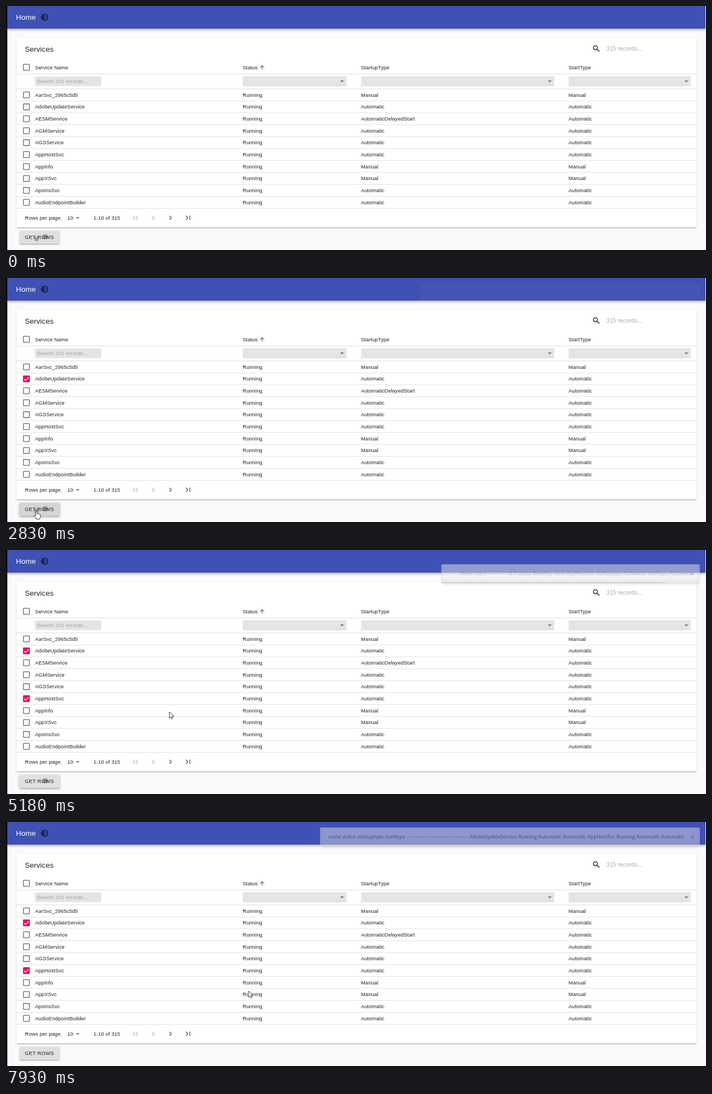
Recreate the animation shown at these times as an HTML page. Size 1264x443 px, loop 8 s.

```html
<!DOCTYPE html>
<html lang="en">
<head>
<meta charset="utf-8">
<title>Services</title>
<style>
  html, body { margin: 0; width: 100%; height: 100%; overflow: hidden; background: #fafafa; }
  #stage { position: absolute; left: 0; top: 0; width: 1264px; height: 443px; overflow: hidden; }
  #stage > div, #stage > svg, .toast, .toast > * { position: absolute; }
  svg { left: 0; top: 0; overflow: visible; }
  text { font: 9.333px "Liberation Sans", Arial, sans-serif; letter-spacing: .01em; fill: #212121; white-space: pre; }
  .title { font-size: 13.333px; letter-spacing: .0075em; }

  #bar { left: 2px; top: 0; width: 1261px; height: 41px; background: #3f51b5;
    box-shadow: 0 1.3px 2.7px -.7px #0003, 0 2.7px 3.3px #00000024, 0 .7px 6.7px #0000001f; }
  #paper { left: 18.5px; top: 57px; width: 1228.5px; height: 345px; background: #fff; border-radius: 2.7px;
    box-shadow: 0 2px .7px -1.3px #0003, 0 1.3px 1.3px #00000024, 0 .7px 3.3px #0000001f; }
  #button { left: 24px; top: 408px; width: 72.5px; height: 23.5px; background: #e0e0e0; border-radius: 2.7px;
    box-shadow: 0 2px .7px -1.3px #0003, 0 1.3px 1.3px #00000024, 0 .7px 3.3px #0000001f;
    animation: hover 8s infinite; }
  @keyframes hover {
    0%, 24.5%, 51.5%, 70%, 87.5%, 100% { background: #e0e0e0; }
    27.5%, 48.8%, 73%, 84.5% { background: #d5d5d5;
      box-shadow: 0 1.3px 2.7px -.7px #0003, 0 2.7px 3.3px #00000024, 0 .7px 6.7px #0000001f; }
  }

  .tick { animation: tick1 8s step-end infinite; }
  .tick.late { animation-name: tick2; }
  @keyframes tick1 { 0% { opacity: 0; } 14%, 100% { opacity: 1; } }
  @keyframes tick2 { 0% { opacity: 0; } 58.6%, 100% { opacity: 1; } }

  .ripple { transform-box: fill-box; transform-origin: center; animation: ripple 8s ease-out infinite both; }
  @keyframes ripple {
    0% { transform: scale(.1); opacity: .28; }
    4% { transform: scale(.9); opacity: .22; }
    8%, 100% { transform: scale(1); opacity: 0; }
  }

  /* keeps a toast that is still fading from carrying over into the next loop */
  #toasts { animation: curtain 8s step-end infinite; }
  @keyframes curtain { 0% { visibility: hidden; } 12%, 100% { visibility: visible; } }
  .toast { top: 9.5px; height: 34.5px; border-radius: 2px; background: rgba(238, 238, 238, .9);
    box-shadow: inset 0 -6.7px 13.3px -6.7px #0003, inset 0 0 3.3px #0000001a, 0 5.3px 5.3px -3.3px #00000040;
    animation: toast 8s infinite both; animation-delay: inherit; }
  .toast > * { animation: 8s infinite both; animation-delay: inherit; }
  .toast span { left: 16px; top: 10px; font: 9.333px/14px Lato, sans-serif; color: rgba(0, 0, 0, .6);
    white-space: pre; animation-name: message; }
  .toast i { left: 0; bottom: 0; width: 100%; height: 1.4px; background: rgba(0, 0, 0, .4);
    transform-origin: left; animation-name: progress; animation-timing-function: linear; }
  .toast svg { left: auto; right: 11px; top: 15px; }
  @keyframes toast {
    0% { opacity: 0; transform: translateY(100%); animation-timing-function: ease; }
    8.75% { opacity: 1; transform: none; }
    13.56% { opacity: 1; transform: none; animation-timing-function: ease; }
    19.8%, 100% { opacity: 0; transform: none; }
  }
  @keyframes message {
    0%, 1.25% { opacity: 0; transform: translateX(33.3px); animation-timing-function: cubic-bezier(.16, .81, .32, 1); }
    13.75%, 100% { opacity: 1; transform: none; }
  }
  @keyframes progress { 0%, 1.06% { transform: none; } 13.56%, 100% { transform: scaleX(0); } }

  #cursor { animation: move 8s infinite ease-in-out, enter 8s step-end infinite; }
  #arrow { animation: arrow 8s step-end infinite; }
  #hand { animation: hand 8s step-end infinite; }
  #cursor path { fill: #fff; stroke: #23232d; stroke-width: .9; stroke-linejoin: round; }
  @keyframes enter { 0% { visibility: hidden; } 2.62%, 100% { visibility: visible; } }
  @keyframes arrow {
    0%, 17.6%, 48.8%, 61.2%, 84.5% { opacity: 1; }
    10.6%, 24.5%, 55%, 70% { opacity: 0; }
  }
  @keyframes hand {
    0%, 17.6%, 48.8%, 61.2%, 84.5% { opacity: 0; }
    10.6%, 24.5%, 55%, 70% { opacity: 1; }
  }
  @keyframes move {
    0%, 2.62% { transform: translate(1124px, 430px); }
    11.25%, 17.3% { transform: translate(36px, 179px); }
    20%, 20.9% { transform: translate(99px, 254px); animation-timing-function: linear; }
    23% { transform: translate(75px, 405px); animation-timing-function: ease-out; }
    25% { transform: translate(60px, 421px); }
    34% { transform: translate(58px, 421px); }
    35.3%, 46% { transform: translate(55px, 423px); }
    49% { transform: translate(62px, 412px); }
    51.75%, 52.9% { transform: translate(70.5px, 340px); }
    55.5%, 61% { transform: translate(37px, 267px); }
    64.75%, 65.7% { transform: translate(295px, 294px); }
    69.5% { transform: translate(100px, 418px); animation-timing-function: ease-out; }
    72% { transform: translate(70px, 428px); }
    79%, 83.5% { transform: translate(71px, 417px); }
    90.6% { transform: translate(359px, 412px); }
    95% { transform: translate(438px, 330px); }
    99.1%, 100% { transform: translate(438px, 307px); }
  }
</style>
</head>
<body>
<div id="stage">
  <div id="bar"></div>
  <div id="paper"></div>
  <div id="button"></div>
  <svg id="page" width="1264" height="443">
    <clipPath id="buttonClip"><rect x="24" y="408" width="72.5" height="23.5" rx="2.7"/></clipPath>
  </svg>
  <div id="toasts"></div>
  <svg width="1264" height="443">
    <rect width="2.3" height="443"/>
    <rect x="1263" width="1" height="443" fill="#eee"/>
    <g id="cursor">
      <path id="arrow" d="M0 0V11.2L2.6 8.8 4.3 12.7 6.2 11.9 4.5 8.1H8Z"/>
      <path id="hand" d="M-1.4 1.2C-1.4-.4 1.2-.4 1.2 1.2V5.2C2 4.5 3.4 4.8 3.5 5.7 4.3 5.1 5.5 5.4 5.6 6.3 6.5 6 7.3 6.5 7.3 7.4V10.5C7.3 12.5 6 13 6 14.6H-.4C-.8 12.6-4 10.5-4.3 8.2-4.3 7-2.6 7-1.4 8.8Z"/>
    </g>
  </svg>
</div>
<script>
const icons = {
  theme: 'M20 8.69V4h-4.69L12 .69 8.69 4H4v4.69L.69 12 4 15.31V20h4.69L12 23.31 15.31 20H20v-4.69L23.31 12 20 8.69zM12 18c-.89 0-1.74-.2-2.5-.55C11.56 16.5 13 14.42 13 12s-1.44-4.5-3.5-5.45C10.26 6.2 11.11 6 12 6c3.31 0 6 2.69 6 6s-2.69 6-6 6z',
  search: 'M15.5 14h-.79l-.28-.27C15.41 12.59 16 11.11 16 9.5 16 5.91 13.09 3 9.5 3S3 5.91 3 9.5 5.91 16 9.5 16c1.61 0 3.09-.59 4.23-1.57l.27.28v.79l5 4.99L20.49 19l-4.99-5zm-6 0C7.01 14 5 11.99 5 9.5S7.01 5 9.5 5 14 7.01 14 9.5 11.99 14 9.5 14z',
  up: 'M4 12l1.41 1.41L11 7.83V20h2V7.83l5.58 5.59L20 12l-8-8-8 8z',
  down: 'M7 10l5 5 5-5z',
  first: 'M18.41 16.59L13.82 12l4.59-4.59L17 6l-6 6 6 6zM6 6h2v12H6z',
  prev: 'M15.41 7.41L14 6l-6 6 6 6 1.41-1.41L10.83 12z',
  next: 'M10 6L8.59 7.41 13.17 12l-4.58 4.59L10 18l6-6z',
  last: 'M5.59 7.41L10.18 12l-4.59 4.59L7 18l6-6-6-6zM16 6h2v12h-2z',
};
const columns = [52.5, 427.3, 641, 1015.8];
const services = [
  ['AarSvc_2965c5d5', 'Manual'], ['AdobeUpdateService', 'Automatic'],
  ['AESMService', 'AutomaticDelayedStart'], ['AGMService', 'Automatic'],
  ['AGSService', 'Automatic'], ['AppHostSvc', 'Automatic'], ['Appinfo', 'Manual'],
  ['AppXSvc', 'Manual'], ['ApsInsSvc', 'Automatic'], ['AudioEndpointBuilder', 'Automatic'],
];
const rowHeight = 21.67;
const rowCenter = i => 161.4 + i * rowHeight;

const text = (x, y, s, attrs = '') => `<text x="${x}" y="${y}" ${attrs}>${s}</text>`;
const icon = (name, x, y, fill = '#707070', scale = 2 / 3) =>
  `<path d="${icons[name]}" fill="${fill}" transform="translate(${x} ${y}) scale(${scale}) translate(-12 -12)"/>`;
const rect = (x, y, w, h, fill, r = 0) =>
  `<rect x="${x}" y="${y}" width="${w}" height="${h}" rx="${r}" fill="${fill}"/>`;
const line = y => rect(18.5, y - .4, 1228.5, .9, '#dcdcdc');
const box = y =>
  `<rect x="31.5" y="${y - 5.3}" width="10.7" height="10.7" rx=".7" fill="none" stroke="#666" stroke-width="1.33"/>`;
const ripple = (x, y, r, fill, ms) =>
  `<circle class="ripple" cx="${x}" cy="${y}" r="${r}" fill="${fill}" style="animation-delay:${ms}ms"/>`;
const tick = (y, cls) => `<g class="tick ${cls}">${rect(30.8, y - 6, 12, 12, '#f50057', 1.3)}
  <path d="M32.7 ${y + .1}l2.9 2.9 5.4-5.6" fill="none" stroke="#fff" stroke-width="1.35"/></g>`;

const cells = (values, y) => values.map((v, i) => text(columns[i], y, v)).join('');
const rows = services.map(([name, type], i) => {
  const start = type === 'Manual' ? type : 'Automatic', y = rowCenter(i);
  return box(y) + cells([name, 'Running', type, start], y + 3.3) + line(y + 10.8);
}).join('');
const selects = [[427.3, 187.5], [641, 349], [1015.8, 220.7]].map(([x, w]) =>
  rect(x, 127.5, w, 18.5, '#e4e4e4', 2.7) + icon('down', x + w - 8, 136.7)).join('');

document.getElementById('page').insertAdjacentHTML('beforeend', [
  text(18, 25, 'Home', 'class="title" style="fill:#fff"'),
  icon('theme', 69.6, 20.3, '#1d2553'),
  text(34, 82.5, 'Services', 'class="title"'),
  icon('search', 1066, 77.5, '#1c1118'),
  text(1084, 81.3, '315 records...', 'style="font-size:10.667px;fill:#a8a8a8;letter-spacing:0"'),
  box(111.2), cells(['Service Name', 'Status', 'StartupType', 'StartType'], 114.5),
  icon('up', 462.5, 111.5, '#555', .5),
  line(123.4), line(150.5),
  rect(52.3, 128, 119.7, 17.6, '#e4e4e4', 2.7),
  text(56, 139.7, 'Search 315 records...', 'style="fill:#a0a0a0"'),
  selects, rows,
  text(34.3, 388, 'Rows per page:'), text(110.7, 387.6, '10'), icon('down', 129.3, 384.5),
  text(158, 388, '1-10 of 315'),
  icon('first', 234, 384.5, '#bdbdbd'), icon('prev', 265.7, 384.5, '#bdbdbd'),
  icon('next', 297, 384.5, '#555'), icon('last', 328.7, 384.5, '#555'),
  ripple(36.8, rowCenter(1), 10, '#f50057', 1050), tick(rowCenter(1), ''),
  ripple(36.8, rowCenter(5), 10, '#f50057', 4640), tick(rowCenter(5), 'late'),
  '<g clip-path="url(#buttonClip)">',
  ripple(55, 423, 44, '#000', 3060), ripple(71, 419, 50, '#000', 6400), '</g>',
  text(34, 423, 'GET ROWS', 'style="letter-spacing:.02857em"'),
].join(''));

const details = (id, name) =>
  `Name Value ---- ----- id ${id} status Running name ${name} startuptype Automatic starttype Automatic`;
const summary = names => 'name status startuptype starttype ---- ------ ----------- ---------'
  + names.map(n => ` ${n} Running Automatic Automatic`).join('');
const [, [firstPick], , , , [secondPick]] = services;

document.getElementById('toasts').innerHTML = [
  [1362, 749, details(1, firstPick)],
  [3335, 744.5, summary([firstPick])],
  [4962, 786, details(7, secondPick)],
  [6700, 566.5, summary([firstPick, secondPick])],
].map(([ms, x, message]) =>
  `<div class="toast" style="left:${x}px;width:${1252.5 - x}px;animation-delay:${ms}ms">
    <span>${message}</span><i></i>
    <svg width="5" height="5"><path d="M0 0L5 5M5 0L0 5" stroke="#0009" stroke-width="1"/></svg>
  </div>`).join('');
</script>
</body>
</html>
```
